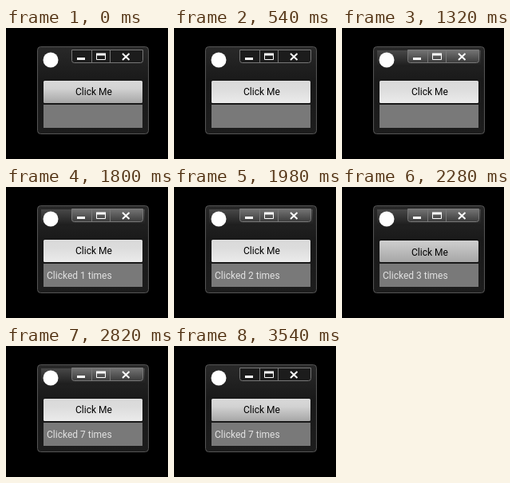
Write an HTML page that moves like this. It is 203 by 164 pixels and loops after 3600 ms.

```html
<!DOCTYPE html>
<html lang="en">
<head>
<meta charset="utf-8">
<style>
  html, body { margin: 0; width: 100%; height: 100%; overflow: hidden; background: #000; }
  svg { display: block; width: 203px; height: 164px; }
  text { font: 12px Roboto, sans-serif; }
</style>
</head>
<body>
<svg viewBox="0 0 203 164">
  <defs>
    <linearGradient id="frame" x2="0" y2="1">
      <stop stop-color="#292929"/><stop offset=".4" stop-color="#191919"/><stop offset="1" stop-color="#1d1d1d"/>
    </linearGradient>
    <linearGradient id="shine" x2="0" y2="1">
      <stop stop-color="#484848"/><stop offset="1" stop-color="#1d1d1d"/>
    </linearGradient>
    <linearGradient id="controlShine" x2="0" y2="1">
      <stop stop-color="#757575"/><stop offset="1" stop-color="#3c3c3c"/>
    </linearGradient>
    <linearGradient id="normal" x2="0" y2="1">
      <stop stop-color="#d9d9d9"/><stop offset=".35" stop-color="#d2d2d2"/><stop offset="1" stop-color="#a6a6a6"/>
    </linearGradient>
    <linearGradient id="hover" x2="0" y2="1">
      <stop stop-color="#d9d9d9"/><stop offset=".35" stop-color="#dcdcdc"/><stop offset="1" stop-color="#ebebeb"/>
    </linearGradient>
    <linearGradient id="pressed" x2="0" y2="1">
      <stop stop-color="#cfcfcf"/><stop offset="1" stop-color="#a6a6a6"/>
    </linearGradient>
  </defs>

  <rect x="39.5" y="23.5" width="139" height="109" rx="4" fill="url(#frame)" stroke="#555"/>
  <rect id="titleShine" x="44" y="28" width="130" height="20" fill="url(#shine)"/>
  <circle cx="56" cy="40" r="9.5" fill="#fff"/>

  <g id="controls" stroke="#777">
    <path d="M82.5 27.5V40.5Q82.5 43.5 85.5 43.5H168.5Q171.5 43.5 171.5 40.5V27.5Z"/>
    <path d="M107.5 28V43M130.5 28V43"/>
  </g>
  <g id="icons" fill="none">
    <path d="M89 38.5H99" stroke-width="3"/>
    <path d="M113 33H125" stroke-width="3"/>
    <path d="M113.5 33V39.5H124.5V33"/>
    <path d="M146 32L154.5 40M154.5 32L146 40" stroke-width="2"/>
  </g>

  <rect x="46.5" y="65.5" width="125" height="29" rx="1.5" fill="#111"/>
  <rect id="button" x="47" width="124" rx="1.5"/>
  <text id="label" x="87">Click Me</text>

  <rect x="47" y="96" width="124" height="29" fill="#797979"/>
  <text id="counter" x="51" y="115" fill="#e2e2e2"></text>
</svg>
<script>
  const LOOP = 3600;
  const presses = [1680, 1920, 2100, 2280, 2460, 2580, 2760];
  const releases = [1740, 1980, 2160, 2340, 2520, 2640, 2820];
  const hovers = [[540, 900], [1200, 2940]];
  const [titleShine, controls, icons, button, label, counter] =
    ['titleShine', 'controls', 'icons', 'button', 'label', 'counter'].map(id => document.getElementById(id));

  const within = (t, [from, to]) => t >= from && t < to;
  const passed = (times, t) => times.filter(time => t >= time).length;

  icons.setAttribute('stroke', '#fff');

  function draw(now) {
    const t = now % LOOP;
    const clicks = passed(releases, t);
    const isDown = passed(presses, t) > clicks;
    const isOver = hovers.some(span => within(t, span));
    const isActive = within(t, [1320, 3540]);
    const state = isDown ? 'pressed' : isOver ? 'hover' : 'normal';

    titleShine.style.visibility = isActive ? 'visible' : 'hidden';
    controls.setAttribute('fill', isActive ? 'url(#controlShine)' : '#1c1c1c');
    button.setAttribute('fill', `url(#${state})`);
    button.setAttribute('y', isDown ? 67 : 66);
    button.setAttribute('height', isDown ? 27 : 28);
    label.setAttribute('y', isDown ? 86 : 84);
    counter.textContent = clicks ? `Clicked ${clicks} times` : '';
    requestAnimationFrame(draw);
  }
  draw(0);
</script>
</body>
</html>
```
